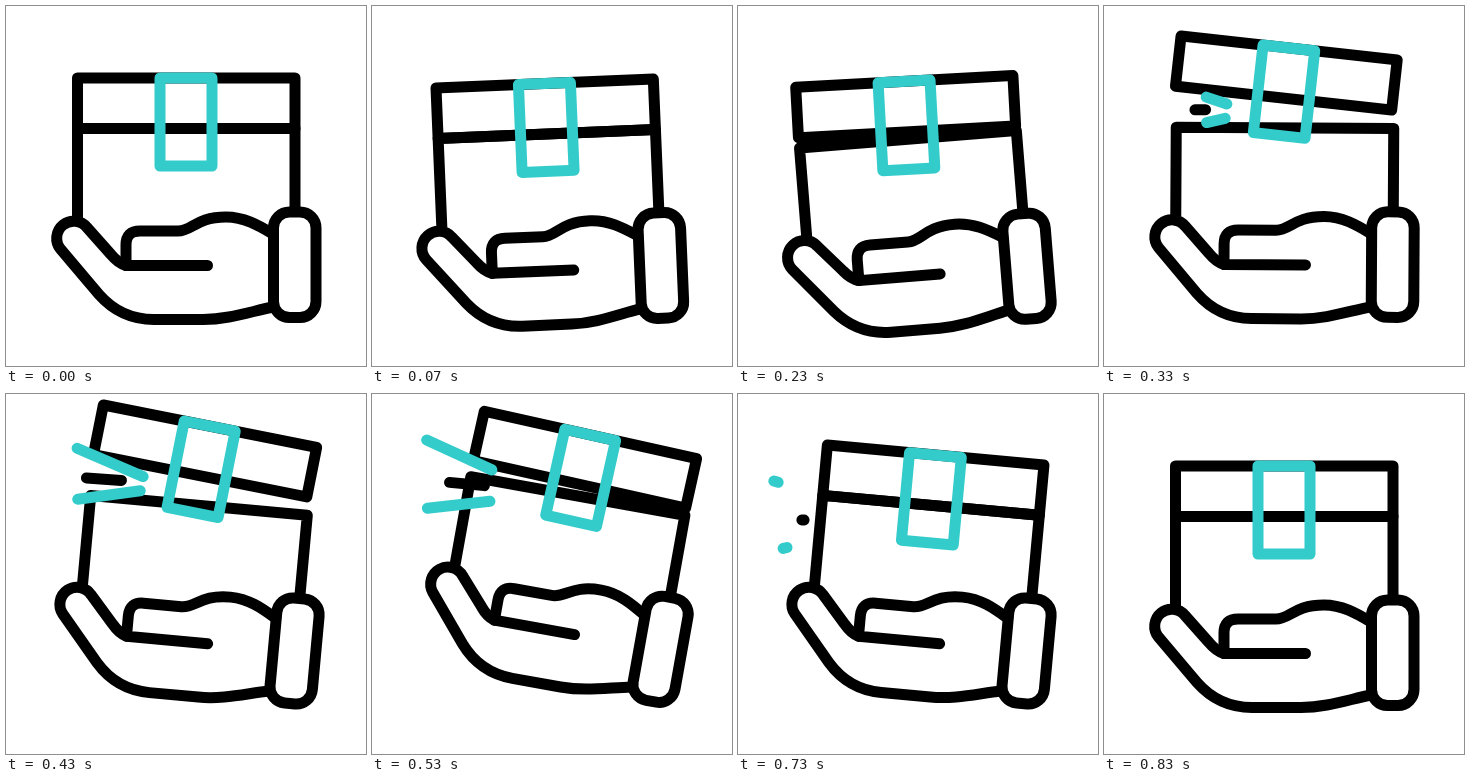
An HTML page for the animation above (1.67 s loop, 360 px wide and 360 px high).

```html
<!DOCTYPE html>
<html lang="en">
<head>
<meta charset="utf-8">
<title>Parcel in hand</title>
<style>
html, body { margin: 0; width: 100%; height: 100%; overflow: hidden; background: #fff; }
svg { display: block; width: 100vw; height: 100vh; }
.ink { fill: none; stroke: #000; stroke-width: 11; stroke-linejoin: round; stroke-linecap: round; }
.teal { stroke: #33cccb; }
</style>
</head>
<body>
<svg viewBox="0 0 360 360">
  <g id="all" class="ink">
    <path stroke-linecap="butt" d="M71.5 212V122.5H289V204"/>
    <path d="M120 259.5Q112 257 105 248.500L81 221.500A17 17 0 0 0 54.500 243L93 288.500Q115 313.500 148 313.500H197C222 313.500 243 306 267 301"/>
    <path d="M201.500 259.500H120V239Q120 225 134 225H172C186 225 190 211 220 211C238 211 252 219 267 228"/>
    <rect x="267.500" y="206" width="42.500" height="105.500" rx="16"/>
    <g id="lid">
      <rect x="71.500" y="72" width="217.500" height="50.500"/>
      <rect class="teal" x="154" y="72" width="52" height="88"/>
      <g id="sparks"></g>
    </g>
  </g>
</svg>
<script>
const LOOP = 1670, STEP = 1000 / 30;
const $ = id => document.getElementById(id);

// Keys are [step, value] pairs.
const TILT = [[0, 0], [5.67, -6.8], [17.65, 12.9], [25, 0]];
const OPEN = [[6, 0], [10, 1], [13, 1], [18, 0]];
const HEAD = [[8.7, 0], [15, 1]];
const TAIL = [[13, 0], [22.4, 1]];

function at(keys, n) {
  if (n <= keys[0][0]) return keys[0][1];
  for (let i = 1; i < keys.length; i++) {
    const [a, from] = keys[i - 1], [b, to] = keys[i];
    if (n <= b) return from + (to - from) * (n - a) / (b - a);
  }
  return keys[keys.length - 1][1];
}

// Each spark runs from a start point to an end point beside the lid.
const sparks = [
  [124.5, 134.5, 21.5, 112.7, "teal"],
  [104, 142.5, 53, 149, ""],
  [124.5, 149, 37, 179, "teal"]
].map(([x0, y0, x1, y1, tone]) => {
  const el = document.createElementNS("http://www.w3.org/2000/svg", "path");
  el.setAttribute("class", tone);
  $("sparks").append(el);
  const point = f => `${x0 + (x1 - x0) * f} ${y0 + (y1 - y0) * f}`;
  return (tail, head) =>
    el.setAttribute("d", head > tail ? `M${point(tail)}L${point(head)}` : "");
});

function draw(time) {
  const n = Math.floor((time % LOOP + 4) / STEP);
  const open = at(OPEN, n), tail = at(TAIL, n), head = at(HEAD, n);
  $("all").setAttribute("transform", `rotate(${at(TILT, n)} 308 256)`);
  $("lid").setAttribute("transform",
    `translate(${-open} ${-41 * open}) rotate(${6 * open} 71.5 122.5)`);
  sparks.forEach(spark => spark(tail, head));
}

let start;
function tick(now) {
  start ??= now;
  draw(Math.max(0, now - start));
  requestAnimationFrame(tick);
}
draw(0);
requestAnimationFrame(tick);
</script>
</body>
</html>
```
